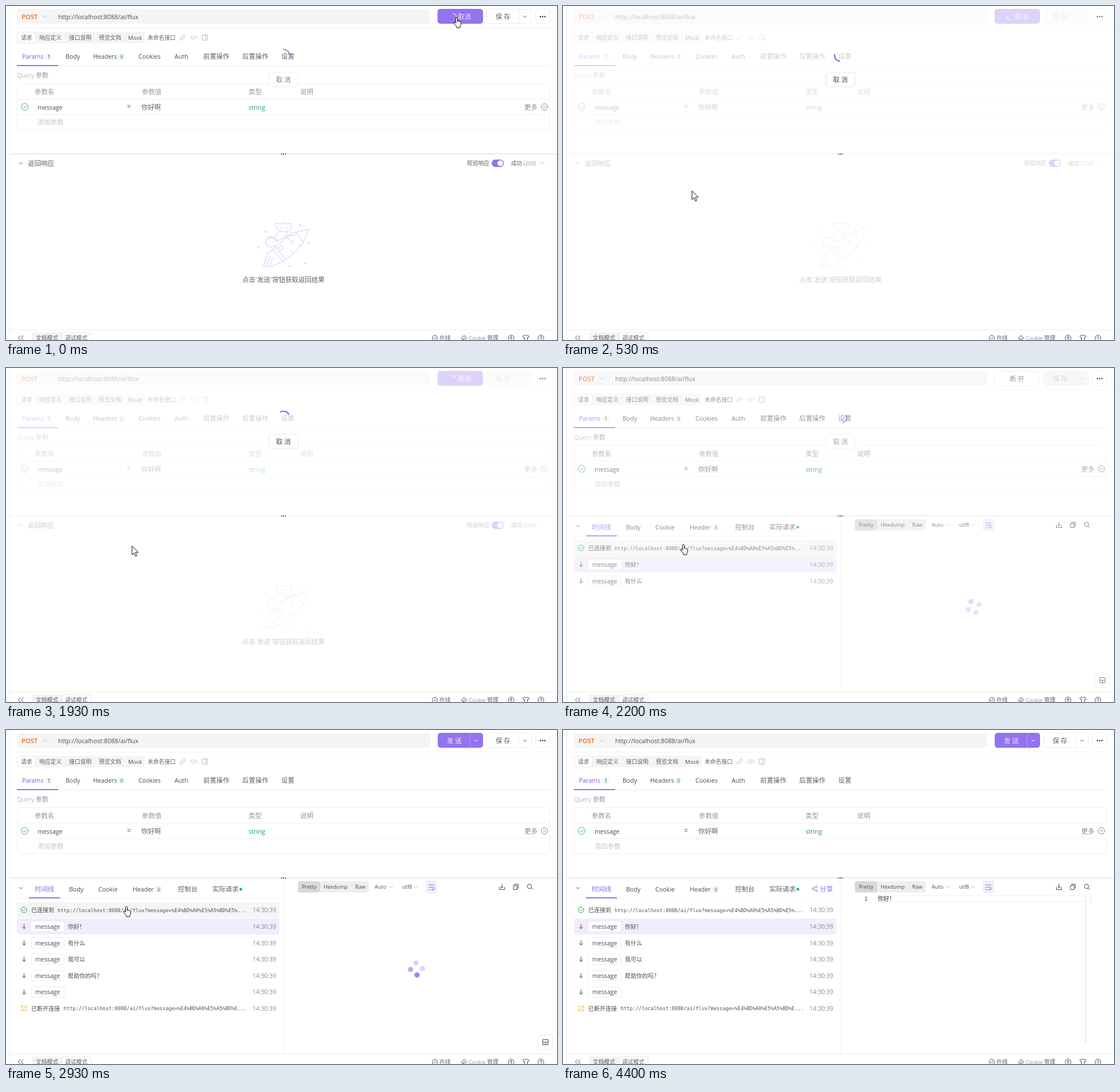
An HTML page for the animation above (5.27 s loop, 961 by 583 pixels).

```html
<!DOCTYPE html>
<html lang="zh-CN">
<head>
<meta charset="utf-8">
<style>
html, body { margin: 0; width: 100%; height: 100%; overflow: hidden; background: #fff }
svg { display: block }
text { font-family: 'Open Sans', 'Noto Sans CJK SC', 'Noto Sans CJK', sans-serif }
.cjk { font-weight: 300; fill-opacity: .88 }
.mono { font-family: 'DejaVu Sans Mono', monospace }
.bold { font-weight: 600 }
</style>
</head>
<body>
<svg id="stage" width="961" height="583" viewBox="0 0 961 583"></svg>
<script>
const INK = '#4b4b50', GREY = '#88888c', PALE = '#bcbcc0', BRAND = '#9373ee', GREEN = '#1fa866';
const LOOP = 5270, STEP = LOOP / 79;

// Markup helpers
const text = (x, y, s, fill = INK, size, cls = '') => {
  const cjk = /[\u2e80-\uffff]/.test(s);
  return `<text x="${x}" y="${y}" fill="${fill}" font-size="${size || (cjk ? 11.4 : 10.6)}" class="${cls || (cjk ? 'cjk' : '')}">${s}</text>`;
};
const path = (d, stroke = INK, w = 1, fill = 'none') =>
  `<path d="${d}" stroke="${stroke}" stroke-width="${w}" fill="${fill}" stroke-linecap="round" stroke-linejoin="round"/>`;
const box = (x, y, w, h, fill, stroke = 'none', r = 5) =>
  `<rect x="${x}" y="${y}" width="${w}" height="${h}" rx="${r}" fill="${fill}" stroke="${stroke}"/>`;
const disc = (x, y, r, fill, stroke = 'none') => `<circle cx="${x}" cy="${y}" r="${r}" fill="${fill}" stroke="${stroke}"/>`;
const group = (id, ...parts) => `<g id="${id}">${parts.join('')}</g>`;
const hline = (x1, x2, y, c = '#eeeeef') => path(`M${x1} ${y}H${x2}`, c);
const vline = (x, y1, y2, c = '#eeeeef') => path(`M${x} ${y1}V${y2}`, c);
const chevron = (x, y, c = PALE, r = 3.5) => path(`M${x - r} ${y - r / 2}l${r} ${r} ${r} ${-r}`, c);
const tick = (x, y, r, c) => disc(x, y, r, 'none', c) + path(`M${x - r * .42} ${y}l${r * .33} ${r * .36} ${r * .55} ${-r * .65}`, c);
const pill = (x, y, s, cls) => box(x - 5, y - 10, 14, 13, '#f5f6f6', 'none', 6) + text(x, y, s, GREEN, 9.5, cls);
const ellipsis = (x, y, gap, r) => [-1, 0, 1].map(i => disc(x + i * gap, y, r, '#333')).join('');
const arc = (id, x, y, r, c, w) =>
  `<g transform="translate(${x} ${y})"><g id="${id}">${path(`M0 ${-r}A${r} ${r} 0 0 1 ${r} 0`, c, w)}</g></g>`;

const request = [
  box(19, 5, 721, 26, '#f5f5f6'), vline(81.5, 6, 30, '#ededee'),
  text(27, 23, 'POST', '#ef6820', 11.2, 'bold'), chevron(68, 18.5),
  text(91, 23, 'http://localhost:8088/ai/flux', INK, 10.8),
  hline(6, 961, 38.5, '#f3f3f4'),
  box(19, 45, 223, 20, '#f5f5f6', 'none', 4), box(19.5, 45.5, 32, 19, '#fff', '#e6e6e8', 4),
  ...[[26, '请求'], [58, '响应定义'], [110, '接口说明'], [162, '预览文档'], [213, 'Mock'], [247, '未命名接口']]
    .map(([x, s]) => text(x, 58.5, s, INK, 9.75)),
  path('M307 53l2-2a2 2 0 0 1 3 3l-2 2M309 57l-2 2a2 2 0 0 1-3-3l2-2M306.5 56.5l3-3', PALE),
  path('M325 52l-2.5 3 2.5 3M331 52l2.5 3-2.5 3M329 51l-2 8', PALE),
  path('M342.5 50.5h9v9h-9zM348.5 50.5v9', PALE),
  text(28, 92, 'Params', '#8258e6'), pill(72, 92, '1', 'bold'), pill(199, 92, '8'),
  ...[[104, 'Body'], [152, 'Headers'], [231, 'Cookies'], [294, 'Auth'], [344, '前置操作'], [412, '后置操作'], [480, '设置']]
    .map(([x, s]) => text(x, 92, s)),
  hline(19, 949, 104.5), box(19, 103, 72, 2, BRAND, 'none', 0),
  text(19, 125, 'Query 参数', GREY, 11),
  box(19.5, 135.5, 929, 80.5, 'none', '#f1f1f2'), hline(20, 948, 162.5, '#f1f1f2'), hline(20, 948, 189.5, '#f1f1f2'),
  ...[[50, '参数名'], [237, '参数值'], [423, '类型'], [513, '说明']].map(([x, s]) => text(x, 154, s, GREY)),
  tick(32.5, 176, 6, '#35b56a'), text(55, 181, 'message'), text(211, 180, '=', INK, 12), text(236, 181, '你好啊'),
  text(423, 181, 'string', '#149a63', 10.9), text(904, 181, '更多', '#77777b'),
  disc(939, 176, 5.5, 'none', GREY), hline(936.5, 941.5, 176, GREY),
  text(55, 207, '添加参数', PALE),
  box(6, 256.5, 955, 3, '#f0f0f2', 'none', 0)
].join('');

const saveButton = (id, fill, ink) => group(id,
  box(838.5, 5.5, 78, 25, fill, '#ececee'), text(854, 23, '保 存', ink), vline(894.5, 6, 30), chevron(905, 18.5, ink, 2.5));

const buttons = [
  group('cancel', box(752.5, 5, 79.5, 26, BRAND), arc('miniSpin', 780, 19, 5.5, '#fff', 1), text(788, 23, '取消', '#fff')),
  group('stop', box(752.5, 5.5, 79, 25, '#fff', '#e8e8ea'), text(779, 23, '断 开')),
  group('send', box(753, 5, 79, 26, BRAND), text(769, 23, '发 送', '#fff'), vline(809.5, 5, 31, '#b39bf3'), chevron(820, 18.5, '#fff', 2.5)),
  saveButton('saveOn', '#fff', INK), saveButton('saveOff', '#f5f5f6', '#bdbdc1'),
  box(923.5, 5.5, 25, 25, 'none', '#eeeeef')
].join('');

const rocket = [
  'M497 397L527 390L519 412Q506 431 483 446L466 425Q484 407 497 397zM505 395L519 412M470 421L487 442',
  'M466 425L455 432Q452 446 449 454Q464 455 471 451L483 446M460 436L455 452M466 440L461 451',
  'M476 422l4-4 4 5-4 4zM496 411l4-3 3 4-4 4zM497 428l4 3M511 416l4 3',
  'M472 387L471 379L478 381Q485 377 491 381L497 379L498 388Q493 395 484 394Q476 393 472 387zM479 387h3M488 387h3',
  'M477 393Q468 400 471 411L486 404L495 407M490 394L488 402L505 400',
  'M470 409Q462 398 456 406Q450 413 456 419Q463 424 470 418M455 408Q460 403 468 405',
  ...[[513, 383], [453, 394], [440, 421], [528, 414], [495, 454], [522, 449]].map(([x, y]) => `M${x - 1.5} ${y}h3M${x} ${y - 1.5}v3`)
].map(d => path(d, '#c9bef8', .9)).join('');

const empty = group('empty',
  chevron(26, 274.5, INK, 2.5), text(38, 279, '返回响应'), text(804, 278, '校验响应', INK, 9.75),
  box(847, 268, 21.5, 13, BRAND, 'none', 6.5), disc(862, 274.5, 5, '#fff'),
  text(881, 278, '成功 (200)', INK, 9.65), chevron(935, 274),
  rocket, text(412, 482, '点击“发送”按钮获取返回结果'));

// Event list
const url = 'http://localhost:8088/ai/flux?message=%E4%BD%A0%E5%A5%BD%E';
const rows = [[2070, '已连接到', url + '5%...'], [2130, '你好！'], [2200, '有什么'], [2270, '我可以'], [2400, '帮助你的吗？'], [2530, ''], [2530, '已断开连接', url + '...']];
const rowY = i => 314.3 + i * 28.6;
const row = ([, label, link], i) => {
  const y = rowY(i);
  const icon = !link ? path(`M31.5 ${y - 4}v8m-3-3l3 3 3-3`)
    : i ? path(`M27 ${y - 1}v-3h3M36 ${y + 1}v3h-3M33 ${y - 4}h3v3M30 ${y + 4}h-3v-3M29.5 ${y + 2}l4-4`, '#f0a020')
    : tick(31.3, y - .3, 5, GREEN);
  const body = link
    ? text(44, y + 4, label, '#333', 10) + text(i ? 100.5 : 90, y + 3.5, link, '#55555a', 8.7, 'mono')
    : box(43.5, y - 9, 58, 18, '#fff', '#ececee', 3) + text(51, y + 4, 'message') + text(108, y + 4, label, '#333', 10);
  return group('row' + i, `<rect id="back${i}" x="19" y="${y - 14}" width="458" height="28" rx="4"/>`, icon, body, text(430, y + 4, '14:30:39', GREY, 10.4));
};

const result = group('result',
  chevron(26, 276, INK, 2.5), text(50, 282, '时间线', '#8258e6'),
  ...[[110, 'Body'], [161, 'Cookie'], [221, 'Header'], [300, '控制台'], [360, '实际请求']].map(([x, s]) => text(x, 282, s)),
  pill(264, 281.5, '8'), disc(409.5, 278, 2.4, '#18b368'),
  hline(19, 477, 293.5, '#f5f5f6'), box(40, 292, 54, 2, BRAND, 'none', 0),
  vline(484.5, 260, 565, '#f0f0f2'),
  rows.map(row).join(''),
  group('share', disc(436, 277, 1.7, 'none', BRAND), disc(442, 273.5, 1.7, 'none', BRAND), disc(442, 280.5, 1.7, 'none', BRAND),
    path('M437.5 276l3-1.7M437.5 278l3 1.7', BRAND), text(448, 282, '分享', '#8258e6')),
  box(509, 264, 124, 19.5, '#eeeeef', 'none', 4), box(509, 264, 39, 19.5, '#d8d8da', 'none', 4),
  ...[[516, 'Pretty'], [554, 'Hexdump'], [609, 'Raw'], [643, 'Auto'], [691, 'utf8']].map(([x, s]) => text(x, 277, s, INK, 9.2)),
  chevron(671, 274), chevron(715, 274),
  box(732, 263, 20, 22, '#f1edfd', 'none', 4), path('M737.5 270.5h9M737.5 274.5h8a2 2 0 0 1 0 4h-3m1.5-1.5l-1.5 1.5 1.5 1.5M737.5 278.5h2', BRAND),
  path('M865 269v6.5m-2.5-2.5l2.5 2.5 2.5-2.5M860.5 274.5v4h9v-4'),
  path('M885.5 271.5h6v7h-6zM887.5 271v-2h6v7h-2'),
  disc(913, 273, 3.8, 'none', INK), path('M916 276l2.5 2.5'),
  group('layout', box(928.5, 532.5, 25, 25, '#fff', '#e9e9eb', 4), path('M936.5 540.5h9v9h-9zM936.5 545h9M941 545v4.5')),
  group('loader', [0, 1, 2, 3].map(i => `<circle id="dot${i}" r="4.6" fill="${BRAND}"/>`).join('')),
  group('editor', hline(549, 921, 289.5), hline(549, 921, 300.5), vline(921.5, 289.5, 300.5, '#e2e2e4'),
    vline(911.5, 289, 549, '#dcdcde'), text(526, 298, '1', '#333', 8.7, 'mono'), text(549, 298, '你好！', '#111', 10)));

const footer = [
  hline(6, 961, 565.5, '#f0f0f1'), path('M25 575.5l-3.5 3.5 3.5 3.5M30 575.5l-3.5 3.5 3.5 3.5'),
  box(45, 570, 104, 20, '#f3f3f4', 'none', 4), box(97.5, 570.5, 51, 20, '#fff', '#e6e6e8', 4),
  text(52, 583, '文档模式', INK, 9.75), text(103, 583, '调试模式', INK, 9.75),
  tick(748, 579.5, 4.5, INK), text(756, 583, '在线', INK, 9.75),
  path('M794.5 580l4.5-5 4.5 4.5-4.5 4-2-1.5zM797 582l3-3'), text(807, 583, 'Cookie 管理', INK, 9.75),
  disc(881, 579.5, 5, 'none', INK), path('M881 582.5v-5.5m-2 2l2-2 2 2'),
  path('M904.5 574.5q2.5 2.5 5 0l3 2-1.5 2.5-1.5-.5v6h-5v-6l-1.5.5-1.5-2.5z'),
  disc(933, 579.5, 5, 'none', INK), path('M931.5 578.5a1.6 1.6 0 1 1 1.6 1.8v.5M933 582.5v.1')
].join('');

const stage = document.getElementById('stage');
stage.innerHTML = [
  vline(6.5, 0, 583, '#ececee'),
  group('page', request, buttons, empty, result), footer,
  group('menu', ellipsis(936, 18.5, 4, 1.3)), ellipsis(484, 258.5, 3.3, 1),
  group('busy', arc('spin', 484, 86, 10.5, '#7355e8', 1.8), box(458.5, 115.5, 51, 25.5, '#fff', '#e6e6e8'), text(471, 133, '取 消', '#333')),
  group('cursor',
    group('hand', path('M-1.5 1.5a1.5 1.5 0 0 1 3 0V7l1-.5 2 .5 2 .8 1 1v4l-1.5 3V18h-6v-2l-3.5-4-1.7-3 1.3-1.2 2.4 2z', '#111', 1, '#fff')),
    group('arrow', path('M0 0V15l3.4-3.2 2.6 5.9 2.4-1-2.5-5.8h4.8z', '#111', 1, '#fff')))
].join('');

const el = id => document.getElementById(id);
const show = (id, on) => el(id).style.display = on ? '' : 'none';
const clamp = v => Math.max(0, Math.min(1, v));
const fade = (t, from) => 1 - (1 - clamp((t - from) / 300)) ** 3;

// Pointer stops: time, x, y
const stops = [[0, 786, 20], [200, 786, 20], [470, 225, 323], [1800, 225, 323], [1930, 220, 311],
  [2130, 210, 308], [3270, 210, 308], [3670, 131, 439], [4000, 131, 439], [4270, 330, 545]];
function pointer(t) {
  const i = stops.findIndex(s => s[0] > t);
  if (i < 0) return null;
  const [a, x, y] = stops[i - 1], [b, u, v] = stops[i], k = (t - a) / (b - a);
  return [x + (u - x) * k, y + (v - y) * k];
}

function draw(t) {
  const done = t >= 2070, closed = t >= 2530, loaded = t >= 3070, left = t >= 4260;
  const veil = fade(t, 0) - fade(t, 2140);
  el('page').style.opacity = 1 - .69 * veil;
  el('menu').style.opacity = 1 - .35 * veil;
  show('busy', t < 2440);
  el('busy').style.opacity = t < 2140 ? clamp(.7 + veil) : veil;

  for (const id of ['spin', 'miniSpin']) el(id).setAttribute('transform', `rotate(${t * .36 - 5})`);
  show('cancel', t < 2190);
  show('stop', t >= 2190 && !closed);
  show('send', closed);
  const locked = t > 60 && !closed;
  show('saveOn', !locked);
  show('saveOff', locked);

  show('empty', !done);
  show('result', done);
  show('loader', !loaded);
  show('editor', loaded);
  show('share', left);
  show('layout', !left);
  for (let i = 0; i < 4; i++) {
    const a = (-34.4 + .3 * (t - 2470) + 90 * i) * Math.PI / 180;
    const s = Math.max(0, t - 2040 - 400 * i) / 1000 % 2;
    const d = el('dot' + i);
    d.setAttribute('cx', 716 + 10.4 * Math.cos(a));
    d.setAttribute('cy', 417.2 + 10.4 * Math.sin(a));
    d.setAttribute('opacity', .3 + .7 * (s < 1 ? s : 2 - s));
  }

  const p = pointer(t);
  const hover = p && done && p[0] < 477 ? Math.floor((p[1] - 300) / 28.6) : -1;
  rows.forEach(([at], i) => {
    show('row' + i, t >= at - 5);
    el('back' + i).setAttribute('fill', i === 1 ? '#f1edfd' : i === hover ? '#f5f5f6' : 'none');
  });
  show('cursor', p);
  if (p) {
    const hand = t < 230 || hover >= 0 && hover < rows.length;
    el('cursor').setAttribute('transform', `translate(${p})`);
    show('hand', hand);
    show('arrow', !hand);
  }
}

function animate() {
  const t = performance.now() % LOOP;
  draw(Math.floor((t + 4) / STEP) % 79 * STEP);
  requestAnimationFrame(animate);
}
animate();
</script>
</body>
</html>
```
